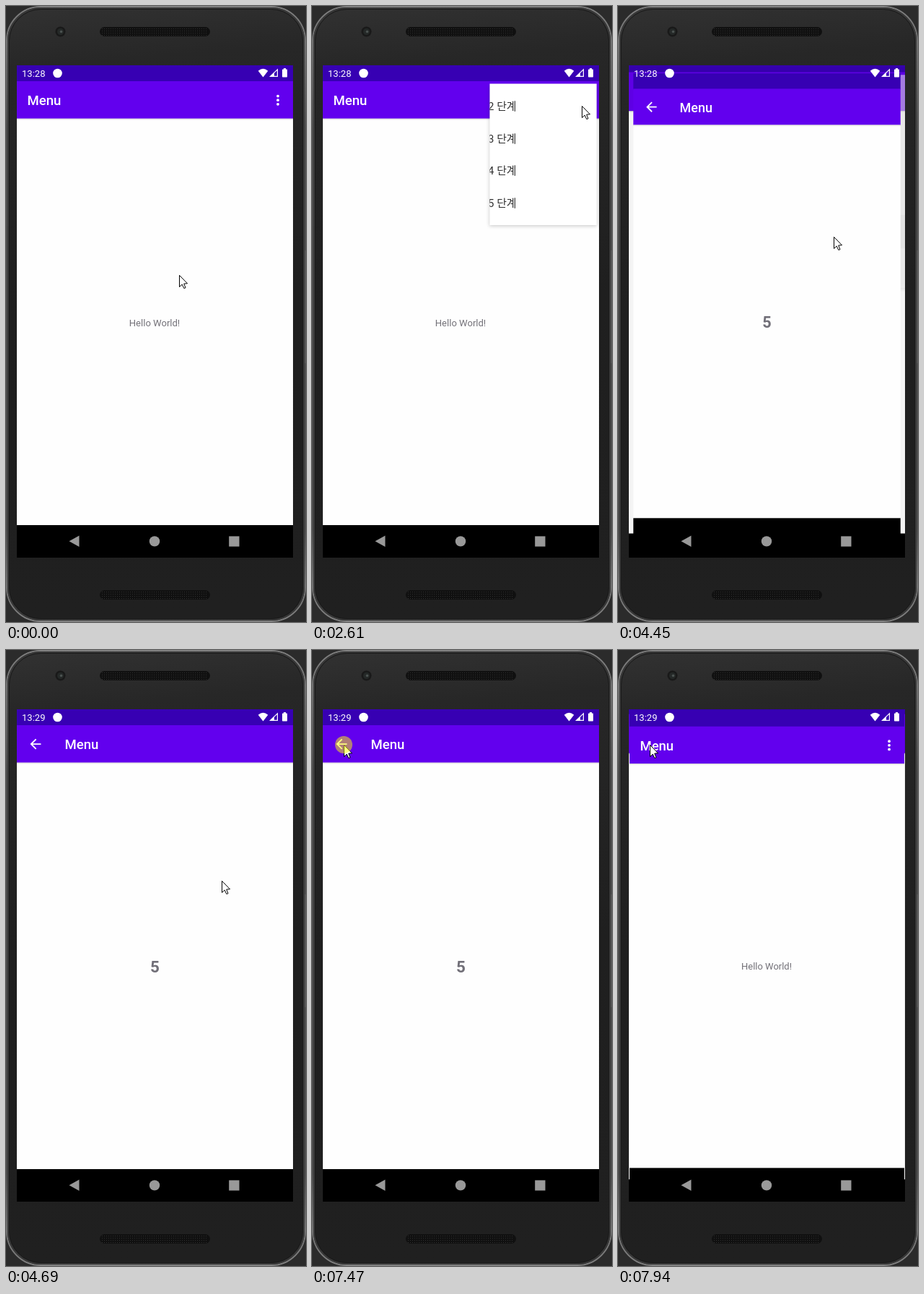
Recreate the animation shown at these times as an HTML page with a canvas. Size 416 by 852 pixels, loop 8000 ms.

```html
<!DOCTYPE html>
<html lang="ko">
<head>
<meta charset="utf-8">
<title>Menu</title>
<style>
html, body { margin: 0; width: 416px; height: 852px; overflow: hidden; background: #2b2b2b; }
canvas { display: block; }
</style>
</head>
<body>
<canvas id="stage" width="416" height="852"></canvas>
<script>
const W = 416, H = 852, LOOP = 8000;
const ctx = document.getElementById('stage').getContext('2d');
const FONT = 'Roboto, "Noto Sans CJK KR", "Noto Sans CJK", sans-serif';
const SCREEN = { x: 15, y: 82, w: 383, h: 681 };
const MID = { x: 206.5, y: 422.5 };
const DP = 0.932;
const POPUP = { top: 107.6, right: 394.7, w: 183.5, h: 283.4, row: 44.7 };

// Redraw bursts: first change, last change, number of changes
const BURSTS = [
  [840, 1610, 11], [1690, 2460, 11], [2530, 3300, 11], [3380, 3690, 5],
  [4150, 4150, 1], [4300, 4690, 6], [5540, 6310, 11], [6390, 6620, 4],
  [6770, 6770, 1], [7470, 7470, 1], [7640, 7940, 5]
];
// Pointer path: time, x, y, easing power of the move that ends here
const PATH = [
  [760, 240, 372, 1], [1610, 357, 213, 1.2], [2460, 376, 123, 0.8],
  [2600, 374, 138, 1], [3300, 310, 260, 1], [3690, 299, 319, 0.8],
  [5460, 299, 319, 1], [6070, 79, 157, 1], [6310, 59, 142, 0.8],
  [6620, 44, 132, 0.8], [6770, 44, 131, 1]
];
const CLICKS = [[2530, 2600], [4150, 4300], [7470, 7640]];
const OPEN = 4348, BACK = 7720;

const clamp = v => Math.max(0, Math.min(1, v));

function heldTime(t) {
  let held = 0;
  for (const [a, b, n] of BURSTS) {
    for (let i = 0; i < n; i++) {
      const s = Math.floor((a + (n > 1 ? (b - a) * i / (n - 1) : 0)) / 10 + 1e-6) * 10;
      if (s <= t) held = s;
    }
  }
  return held;
}

function pointerAt(t) {
  let prev = PATH[0];
  if (t <= prev[0]) return prev.slice(1, 3);
  for (const key of PATH) {
    if (t <= key[0]) {
      const k = Math.pow((t - prev[0]) / (key[0] - prev[0]), key[3]);
      return [1, 2].map(i => Math.round(prev[i] + (key[i] - prev[i]) * k));
    }
    prev = key;
  }
  return prev.slice(1, 3);
}

function cubic(a, b, c, d, s) {
  const r = 1 - s;
  return a * r * r * r + 3 * b * s * r * r + 3 * c * s * s * r + d * s * s * s;
}

// Two joined curves: quick start, very slow finish
function slowIn(u) {
  u = clamp(u);
  const first = u < 1 / 6;
  const xs = first ? [0, 0.05, 0.1333, 1 / 6] : [1 / 6, 0.2083, 0.25, 1];
  const ys = first ? [0, 0, 0.06, 0.4] : [0.4, 0.82, 1, 1];
  let lo = 0, hi = 1;
  for (let i = 0; i < 24; i++) {
    const m = (lo + hi) / 2;
    if (cubic(...xs, m) < u) lo = m; else hi = m;
  }
  return cubic(...ys, hi);
}

function rect(g, x, y, w, h, color) {
  g.fillStyle = color;
  g.fillRect(x, y, w, h);
}

function pill(g, x, y, w, h, r, color) {
  g.beginPath();
  g.roundRect(x, y, w, h, r);
  g.fillStyle = color;
  g.fill();
}

function disc(g, x, y, r, color) {
  g.beginPath();
  g.arc(x, y, r, 0, Math.PI * 2);
  g.fillStyle = color;
  g.fill();
}

function poly(g, points, color) {
  g.beginPath();
  points.forEach(([x, y]) => g.lineTo(x, y));
  g.closePath();
  g.fillStyle = color;
  g.fill();
}

function label(str, x, y, size, color, weight = 400, align = 'left') {
  ctx.font = `${weight} ${size}px ${FONT}`;
  ctx.textAlign = align;
  ctx.fillStyle = color;
  ctx.fillText(str, x, y);
}

function shades(g, x, y, stops) {
  const fill = g.createLinearGradient(0, 0, x, y);
  stops.forEach(([at, color]) => fill.addColorStop(at, color));
  return fill;
}

function makePhone() {
  const c = document.createElement('canvas');
  c.width = W;
  c.height = H;
  const g = c.getContext('2d');
  rect(g, 0, 0, W, H, '#2b2b2b');
  pill(g, 0, 0, W, H, 48, shades(g, 70, H,
    [[0, '#323232'], [0.1, '#272727'], [0.5, '#1f1f1f'], [1, '#202020']]));
  const outline = (d, r, color, width) => {
    g.beginPath();
    g.roundRect(d, d, W - 2 * d, H - 2 * d, r);
    g.strokeStyle = color;
    g.lineWidth = width;
    g.stroke();
  };
  outline(1, 47, shades(g, 0, H,
    [[0, '#808080'], [0.06, '#707070'], [0.2, '#4c4c4c'], [0.85, '#4c4c4c'], [0.95, '#747474'], [1, '#808080']]), 2);
  outline(3, 45, '#383838', 2);
  outline(4.5, 44, '#191919', 1);
  rect(g, 414, 338, 2, 156, '#555');
  for (const y of [29, 808]) {
    pill(g, 130, y, 153, 13, 6.5, '#101010');
    for (let j = 0; j < 4; j++) {
      for (let i = 0; i < 49; i++) rect(g, 133 + i * 3, y + 2 + j * 3, 1, 1, '#303030');
    }
  }
  disc(g, 75.5, 35.5, 7, '#191919');
  disc(g, 75.5, 35.5, 4.5, '#252928');
  disc(g, 76.5, 35.5, 1.8, '#4b5250');
  return c;
}

function drawPopup(grow, pressed, alpha) {
  const w = 70 + (POPUP.w - 70) * grow, h = POPUP.h * grow;
  const left = POPUP.right - w;
  const dx = left - (POPUP.w - w) / 2, dy = POPUP.top - (POPUP.h - h) / 2;
  const r = grow < 0.9 ? 0 : 2;
  ctx.save();
  ctx.globalAlpha *= alpha;
  ctx.shadowColor = 'rgba(0,0,0,.2)';
  ctx.shadowBlur = 5;
  ctx.shadowOffsetY = 2;
  pill(ctx, left, POPUP.top, w, h, r, '#fff');
  ctx.shadowColor = 'transparent';
  ctx.beginPath();
  ctx.roundRect(left, POPUP.top, w, h, r);
  ctx.clip();
  for (let i = 0; i < 6; i++) {
    const y = dy + 7.5 + i * POPUP.row;
    if (pressed && i === 4) rect(ctx, dx, y, POPUP.w, POPUP.row, '#e6e6e6');
    label(`${i + 1} 단계`, dx + 15.3, y + 28.2, 14.9, '#303030');
  }
  ctx.restore();
}

function backArrow() {
  ctx.save();
  ctx.translate(29.8, 118.9);
  ctx.scale(DP, DP);
  poly(ctx, [[20, 11], [7.83, 11], [13.42, 5.41], [12, 4], [4, 12], [12, 20],
    [13.41, 18.59], [7.83, 13], [20, 13]], '#fff');
  ctx.restore();
}

function drawPage(detail, scale, alpha, popup) {
  ctx.save();
  ctx.globalAlpha = alpha;
  ctx.translate(MID.x, MID.y);
  ctx.scale(scale, scale);
  ctx.translate(-MID.x, -MID.y);
  const { x, w } = SCREEN;
  rect(ctx, x, 82, w, 23, '#3700b3');
  rect(ctx, x, 104, w, 52, '#6200ee');
  rect(ctx, x, 155.6, w, 563, '#fefefe');
  rect(ctx, x, 718, w, 45, '#000');
  rect(ctx, x, 155.6, w, 1, 'rgba(0,0,0,.14)');
  rect(ctx, x, 156.6, w, 1, 'rgba(0,0,0,.05)');
  if (detail) {
    backArrow();
    label('Menu', 81.5, 137.3, 18.6, '#fff', 500);
    label('5', MID.x, 446, 22.4, '#716f78', 700, 'center');
  } else {
    label('Menu', 29.5, 137.3, 18.6, '#fff', 500);
    for (const d of [-1, 0, 1]) disc(ctx, 377, 130.2 + d * 5.6, 1.9, '#fff');
    label('Hello World!', 206, 442.5, 13.05, '#737178', 400, 'center');
  }
  if (popup) drawPopup(popup.grow, popup.pressed, popup.alpha);
  ctx.restore();
}

function drawBars(t) {
  label(t < 4610 ? '13:28' : '13:29', 22, 98, 13.05, '#fff');
  disc(ctx, 71.5, 93, 6.3, '#fff');
  ctx.beginPath();
  ctx.moveTo(356.5, 98.5);
  ctx.lineTo(349.7, 89.7);
  ctx.quadraticCurveTo(356.5, 83.8, 363.3, 89.7);
  ctx.closePath();
  ctx.fillStyle = '#fff';
  ctx.fill();
  ctx.beginPath();
  ctx.moveTo(366.5, 97.4);
  ctx.lineTo(376.4, 97.4);
  ctx.lineTo(376.4, 87.8);
  ctx.closePath();
  ctx.strokeStyle = '#fff';
  ctx.lineWidth = 1.2;
  ctx.stroke();
  poly(ctx, [[365.5, 98], [372, 98], [372, 91.5]], '#fff');
  pill(ctx, 383, 87.5, 7, 11, 0.8, '#fff');
  rect(ctx, 385, 86, 3, 2, '#fff');
  poly(ctx, [[87.5, 740.3], [101.5, 732.5], [101.5, 748]], '#999');
  disc(ctx, 206, 740.4, 7.2, '#999');
  rect(ctx, 309.2, 733.4, 14.3, 14.2, '#999');
}

function drawPointer(t) {
  const [x, y] = pointerAt(t);
  ctx.save();
  ctx.translate(x + 0.5, y + 0.5);
  poly(ctx, [[0, 0], [0, 16], [3.7, 12.6], [6.3, 18], [8.5, 17.2], [6.2, 11.6], [11, 11.3]], '#fff');
  ctx.strokeStyle = '#000';
  ctx.lineWidth = 1;
  ctx.stroke();
  ctx.restore();
  if (CLICKS.some(([a, b]) => t >= a && t < b)) disc(ctx, x, y, 12, 'rgba(255,255,0,.5)');
}

// The incoming page grows over the outgoing one
function drawSwitch(toDetail, ms, popup) {
  const p = slowIn(ms / 400);
  const alpha = clamp((ms - 35) / 50);
  drawPage(!toDetail, 1 + 0.05 * p, 1, popup);
  if (ms > 0) rect(ctx, SCREEN.x, SCREEN.y, SCREEN.w, SCREEN.h, `rgba(0,0,0,${0.05 * p})`);
  if (alpha > 0) drawPage(toDetail, 0.85 + 0.15 * p, alpha);
}

function popupAt(t) {
  if (t <= 2530) return null;
  const u = clamp((t - 2530) / 158);
  const alpha = 1 - clamp((t - 4370) / 160);
  return alpha > 0 ? { grow: 1 - (1 - u) * (1 - u), pressed: t >= 4300, alpha } : null;
}

const phone = makePhone();

function draw(t) {
  ctx.drawImage(phone, 0, 0);
  ctx.save();
  ctx.beginPath();
  ctx.rect(SCREEN.x, SCREEN.y, SCREEN.w, SCREEN.h);
  ctx.clip();
  if (t < 4690) drawSwitch(true, t - OPEN, popupAt(t));
  else if (t < 7640) drawPage(true, 1, 1);
  else drawSwitch(false, t - BACK);
  drawBars(t);
  ctx.restore();
  drawPointer(t);
}

let start = null;
function tick(now) {
  if (start === null) start = now;
  draw(heldTime((now - start) % LOOP));
  requestAnimationFrame(tick);
}
draw(0);
requestAnimationFrame(tick);
</script>
</body>
</html>
```
